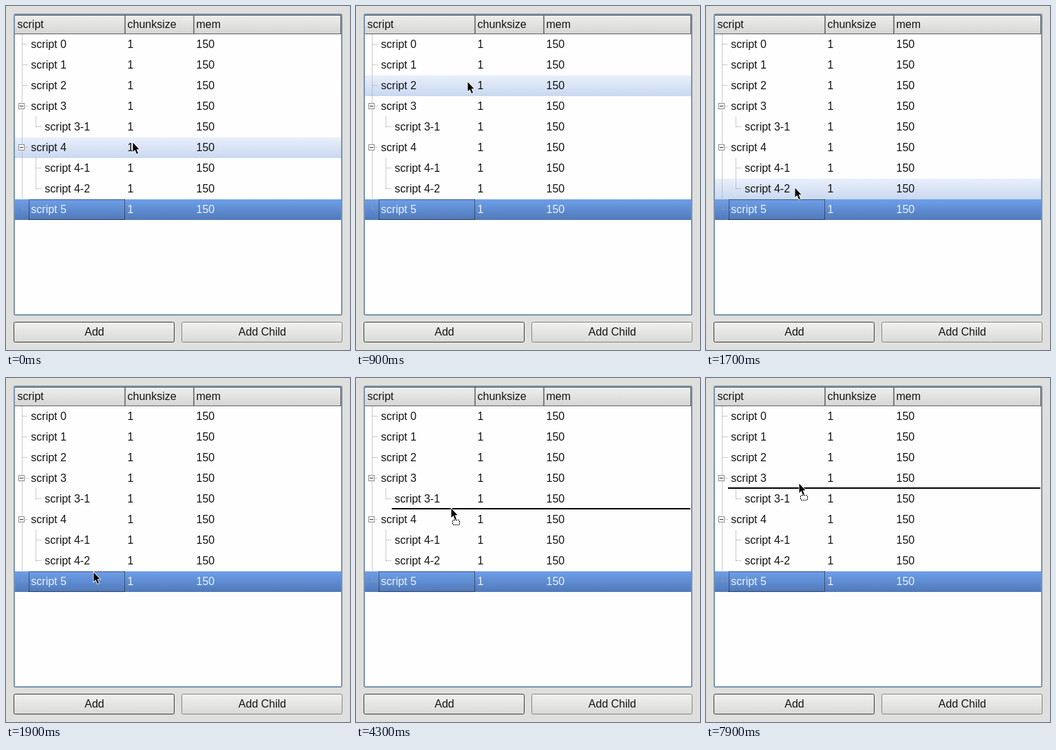
An HTML page for the animation above (8000 ms loop, 500x500 px).

```html
<!DOCTYPE html>
<html lang="en">
<head>
<meta charset="utf-8">
<title>Tree drag and drop</title>
<style>
  html, body { margin: 0; width: 100%; height: 100%; overflow: hidden; background: #dfdfdd; }
  svg { display: block; width: 100%; height: 100%; }
  text { font: 16px "Liberation Sans", Arial, sans-serif; fill: #141414; white-space: pre; }
  .selected { fill: #edf2fb; }
  .dotted { fill: none; stroke: #999; stroke-dasharray: 1 1; }
  .focus { stroke: #111; }
</style>
</head>
<body>
<svg viewBox="0 0 500 500">
  <defs>
    <linearGradient id="hover" x2="0" y2="1"><stop stop-color="#e9effb"/><stop offset="1" stop-color="#c9d8f0"/></linearGradient>
    <linearGradient id="selected" x2="0" y2="1"><stop stop-color="#6e9fe9"/><stop offset="1" stop-color="#5079b9"/></linearGradient>
    <linearGradient id="header" x2="0" y2="1"><stop stop-color="#efefee"/><stop offset="1" stop-color="#d5d5d3"/></linearGradient>
    <linearGradient id="button" x2="0" y2="1"><stop stop-color="#f1f1f0"/><stop offset="1" stop-color="#d9d9d7"/></linearGradient>
  </defs>
  <g id="frame"></g>
  <rect id="hoverRow" x="13" width="474" height="30" fill="url(#hover)"/>
  <g id="tree"></g>
  <path id="drop" fill="none" stroke="#000" stroke-width="2"/>
  <g id="pointer">
    <path d="M.5 .5V14L3.5 11L6 17L8 16L5.6 10.3H9.5Z" stroke="#fff" stroke-width="1.6" paint-order="stroke"/>
    <g id="dragIcon">
      <rect x="2.5" y="17.5" width="10" height="7" rx="1.5" fill="#fff"/>
      <rect x="2.5" y="17.5" width="10" height="7" rx="1.5" fill="none" stroke="#000" stroke-width="1.2" stroke-dasharray="2 1"/>
    </g>
  </g>
</svg>
<script>
const LOOP = 8000, STEP = 100, DRAG_START = 3000;
const LEFT = 13, RIGHT = 487, TOP = 41, ROW = 30, INDENT = 20;
const COLUMNS = [LEFT, LEFT + 160, LEFT + 260];
const byId = id => document.getElementById(id);
const rowTop = i => TOP + i * ROW;

// One entry per script: how many children it has.
const rows = [0, 0, 0, 1, 2, 0].flatMap((children, i) => [
  { label: `script ${i}`, depth: 0, children },
  ...Array.from({ length: children }, (_, k) => ({ label: `script ${i}-${k + 1}`, depth: 1, children: 0 }))
]);
const selected = rows.length - 1;

// The pointer rests between eased moves.
const origin = { x: 184, y: 198 };
const moves = [
  { from: 0, to: 600, x: 184, y: 34 },
  { from: 600, to: 1200, x: 139, y: 186 },
  { from: 1200, to: 1900, x: 127, y: 282 },
  { from: 1900, to: 2600, x: 82, y: 288 },
  { from: 3200, to: 4300, x: 138, y: 189 },
  { from: 4700, to: 5000, x: 138, y: 200 },
  { from: 5000, to: 5500, x: 136, y: 176 },
  { from: 6100, to: 6500, x: 138, y: 168 },
  { from: 7500, to: 7900, x: 135, y: 153 }
];

function add(parent, tag, attrs, content = '') {
  const el = document.createElementNS('http://www.w3.org/2000/svg', tag);
  for (const key in attrs) el.setAttribute(key, attrs[key]);
  el.textContent = content;
  parent.append(el);
}

function buildFrame() {
  const g = byId('frame');
  const rect = (x, y, width, height, fill, more) => add(g, 'rect', { x, y, width, height, fill, ...more });
  rect(0, 0, 500, 500, '#dfdfdd');
  rect(12, 12, 476, 437, '#fefefe', { rx: 2, stroke: '#7895b2', 'stroke-width': 2 });
  rect(LEFT, LEFT, RIGHT - LEFT, TOP - LEFT, 'url(#header)');
  add(g, 'path', { d: `M${LEFT} 13.5H${RIGHT}M${LEFT} 40.5H${RIGHT}M486.5 13V41`, stroke: '#5c5f62' });
  ['script', 'chunksize', 'mem'].forEach((title, i) => {
    const x = COLUMNS[i];
    if (i) add(g, 'path', { d: `M${x} 13V41`, stroke: '#5c5f62', 'stroke-width': 1.5 });
    add(g, 'text', { x: x + 3.5, y: 32 }, title);
  });
  ['Add', 'Add Child'].forEach((label, i) => {
    const x = 11.5 + 244 * i;
    rect(x, 459.5, 233, 29, 'url(#button)', { rx: 2, stroke: i ? '#858585' : '#3c3c3c' });
    add(g, 'text', { x: x + 117, y: 479, 'text-anchor': 'middle' }, label);
  });
}

function buildTree() {
  const g = byId('tree');
  const dotted = (d, extra = '') => add(g, 'path', { d, class: `dotted ${extra}` });
  add(g, 'rect', { x: LEFT, y: rowTop(selected), width: RIGHT - LEFT, height: ROW, fill: 'url(#selected)' });
  dotted(`M23.5 ${TOP}V${rowTop(selected) + 15}`);
  rows.forEach(({ label, depth, children }, i) => {
    const y = rowTop(i), mid = y + 14.5, indent = INDENT * depth;
    dotted(`M${24 + indent} ${mid}h8`);
    if (children) {
      dotted(`M43.5 ${y + ROW}V${rowTop(i + children) + 15}`);
      add(g, 'rect', { x: 18.5, y: mid - 4, width: 8, height: 8, fill: '#fff', stroke: '#8a8a8a' });
      add(g, 'path', { d: `M20 ${mid}h5`, stroke: '#333' });
    }
    [label, '1', '150'].forEach((value, c) => add(g, 'text', {
      x: c ? COLUMNS[c] + 3.5 : 36.3 + indent, y: y + 20, class: i === selected ? 'selected' : ''
    }, value));
  });
  const top = rowTop(selected), bottom = top + ROW;
  dotted(`M33 ${top + .5}H173M33 ${bottom - .5}H173M33.5 ${top}V${bottom}M172.5 ${top}V${bottom}`, 'focus');
}

function pointerAt(t) {
  let { x, y } = origin;
  for (const move of moves) {
    const k = Math.min(1, Math.max(0, (t - move.from) / (move.to - move.from)));
    const eased = (1 - Math.cos(Math.PI * k)) / 2;
    x += (move.x - x) * eased;
    y += (move.y - y) * eased;
  }
  return [Math.round(x), Math.round(y)];
}

// Outer thirds of a row insert beside it, the middle third drops onto it.
function dropShape(y) {
  const pos = (y - TOP) / ROW, row = Math.floor(pos), part = pos - row;
  if (row >= selected) return '';
  const x = 32 + INDENT * rows[row].depth, top = rowTop(row), bottom = top + ROW;
  if (part < 1 / 3) return `M${x} ${top - 1}H486`;
  if (part > 2 / 3) return `M${x} ${bottom - 1}H486`;
  return `M${x + 1} ${top}H486V${bottom}H${x + 1}Z`;
}

function render(time) {
  const t = Math.floor((time % LOOP) / STEP) * STEP;
  const [x, y] = pointerAt(t);
  const dragging = t >= DRAG_START;
  const row = Math.floor((y - TOP) / ROW);
  const hovering = !dragging && row >= 0 && row < selected;
  byId('hoverRow').style.display = hovering ? '' : 'none';
  byId('hoverRow').setAttribute('y', rowTop(row));
  byId('drop').setAttribute('d', dragging ? dropShape(y) : '');
  byId('dragIcon').style.display = dragging ? '' : 'none';
  byId('pointer').setAttribute('transform', `translate(${x} ${y})`);
}

buildFrame();
buildTree();
const start = performance.now();
function tick() {
  render(performance.now() - start);
  requestAnimationFrame(tick);
}
tick();
</script>
</body>
</html>
```
